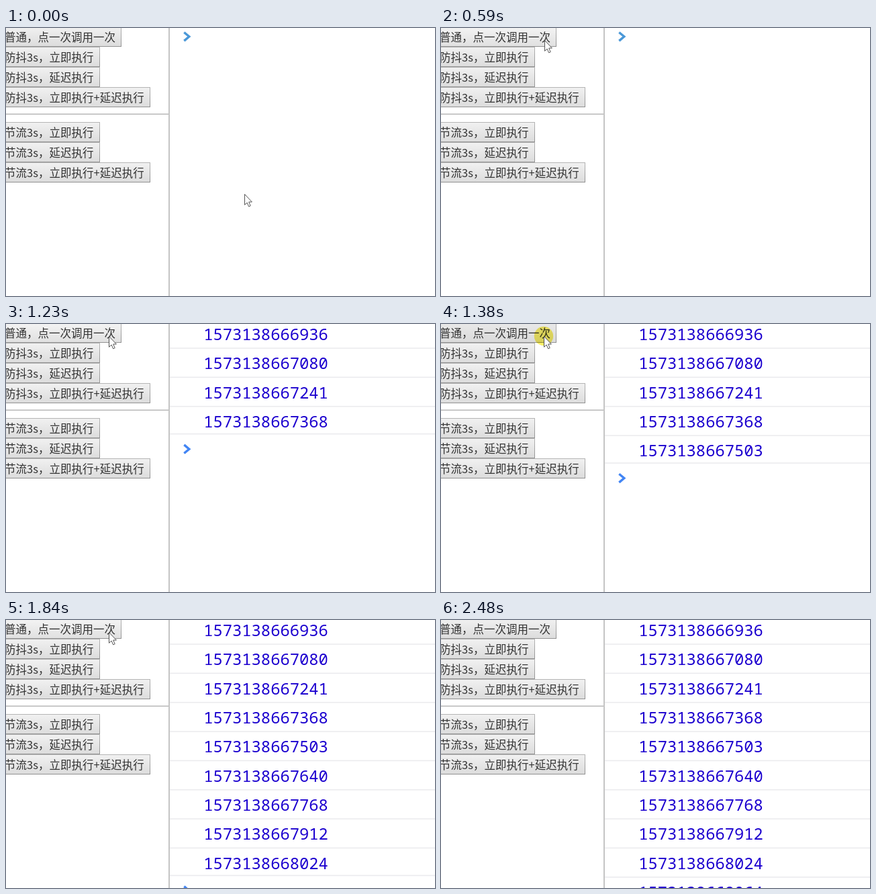
Animation of 639x399 px, one loop 3.18 s. Source, as an HTML page:

```html
<!DOCTYPE html>
<html lang="zh-CN">
<head>
<meta charset="utf-8">
<title>防抖与节流</title>
<style>
  html, body { margin: 0; width: 100%; height: 100%; overflow: hidden; background: #fff; }
  svg { display: block; width: 100%; height: 100%; }
  .label { font: 300 16.5px "Noto Sans CJK SC", "Noto Sans CJK", sans-serif; fill: #333; }
  .log { font: 23.8px "Noto Sans Mono", monospace; fill: #1c00cf; }
  .halo { fill: #faf068; mix-blend-mode: multiply; }
</style>
</head>
<body>
<svg id="stage" viewBox="0 0 639 399">
  <defs>
    <linearGradient id="normal" x2="0" y2="1"><stop stop-color="#f1f1f1"/><stop offset="1" stop-color="#dcdcdc"/></linearGradient>
    <linearGradient id="hover" x2="0" y2="1"><stop stop-color="#f4f4f4"/><stop offset="1" stop-color="#e0e0e0"/></linearGradient>
    <linearGradient id="pressed" x2="0" y2="1"><stop stop-color="#e9e9e9"/><stop offset="1" stop-color="#dadada"/></linearGradient>
    <linearGradient id="edge" x2="0" y2="1"><stop stop-color="#b4b4b4"/><stop offset="1" stop-color="#929292"/></linearGradient>
  </defs>
  <rect width="639" height="399" fill="#fff"/>
  <g id="buttons"></g>
  <path d="M0 128.2H242" stroke="#b8b8b8" stroke-width="1.6"/>
  <path d="M243 0V399" stroke="#c4c4c4" stroke-width="2"/>
  <g id="console"></g>
  <path id="chevron" d="M265.3 -6.3L272.8 0L265.3 6.3" fill="none" stroke-width="3.4"/>
  <circle id="halo" class="halo" cx="153" cy="18" r="14.2"/>
  <path id="arrow" d="M.5 .5V16.3L4.1 13L6.6 18.8L9.2 17.7L6.7 12H11.4Z" fill="#fff" stroke="#555"/>
  <path id="resize" d="M253.7 104.5L258 100.5V103.5H272V100.5L276.3 104.5L272 108.5V105.5H258V108.5Z" fill="#fff" stroke="#333"/>
</svg>
<script>
const LOOP = 3180, PITCH = 43.35;
const $ = id => document.getElementById(id);

function add(parent, tag, attrs, text = "") {
  const node = document.createElementNS("http://www.w3.org/2000/svg", tag);
  for (const key in attrs) node.setAttribute(key, attrs[key]);
  node.textContent = text;
  parent.append(node);
  return node;
}

const show = (node, on) => node.setAttribute("visibility", on ? "visible" : "hidden");

const buttons = [
  ["普通，点一次调用一次", -2, 172],
  ["防抖3s，立即执行", 28, 140],
  ["防抖3s，延迟执行", 58, 140],
  ["防抖3s，立即执行+延迟执行", 88, 215],
  ["节流3s，立即执行", 140, 140],
  ["节流3s，延迟执行", 170, 140],
  ["节流3s，立即执行+延迟执行", 200, 215],
].map(([text, top, right]) => {
  const face = add($("buttons"), "rect", { x: -9.5, y: top + .5, width: right + 9, height: 29, stroke: "url(#edge)" });
  add($("buttons"), "text", { x: -1.9, y: top + 21.5, class: "label" }, text);
  return face;
});

const stamps = [6936, 7080, 7241, 7368, 7503, 7640, 7768, 7912, 8024, 8064];
const rows = stamps.map((ms, i) => ({
  text: add($("console"), "text", { x: 294.2, y: 24 + PITCH * i, class: "log" }, "157313866" + ms),
  rule: add($("console"), "rect", { x: 244, width: 395, height: 1.6, fill: "#ebebee" }),
}));

// Each step is [start time, value]; the latest one reached holds.
const at = (steps, t) => steps.findLast(([start]) => t >= start)[1];

const logCount = [[0, 0], [910, 2], [1060, 3], [1230, 4], [1380, 5], [1530, 6], [1690, 7], [1840, 9], [2160, 10]];
const pointer = [[0, [355, 247]], [130, [211, 95]], [290, [191, 62]], [440, [172, 33]],
  [590, [154, 18]], [760, [153, 18]], [2330, null]];
const hovered = [[0, -1], [130, 3], [290, -1], [590, 0], [2330, -1]];
const pressing = [[0, false], [1380, true], [1840, false], [2010, true], [2330, false]];

function draw(now) {
  const t = now % LOOP;
  const count = at(logCount, t), tip = at(pointer, t);
  const over = at(hovered, t), down = at(pressing, t);

  buttons.forEach((face, i) => {
    const state = i !== over ? "normal" : down ? "pressed" : "hover";
    face.setAttribute("fill", `url(#${state})`);
  });

  rows.forEach(({ text, rule }, i) => {
    show(text, i < count);
    show(rule, i < count);
    // The last rule sits slightly higher, closing the list.
    rule.setAttribute("y", 35.2 + PITCH * i - (i === count - 1 ? 2.4 : 0));
  });

  $("chevron").setAttribute("transform", `translate(0 ${12.8 + PITCH * count})`);
  $("chevron").setAttribute("stroke", count ? "#4285f4" : "#4a98d8");
  show($("chevron"), count < 10);

  show($("halo"), down);
  show($("arrow"), tip);
  if (tip) $("arrow").setAttribute("transform", `translate(${tip})`);
  show($("resize"), t >= 2330 && t < 2480);
}

const start = performance.now();
function tick() {
  draw(performance.now() - start);
  requestAnimationFrame(tick);
}
tick();
</script>
</body>
</html>
```
